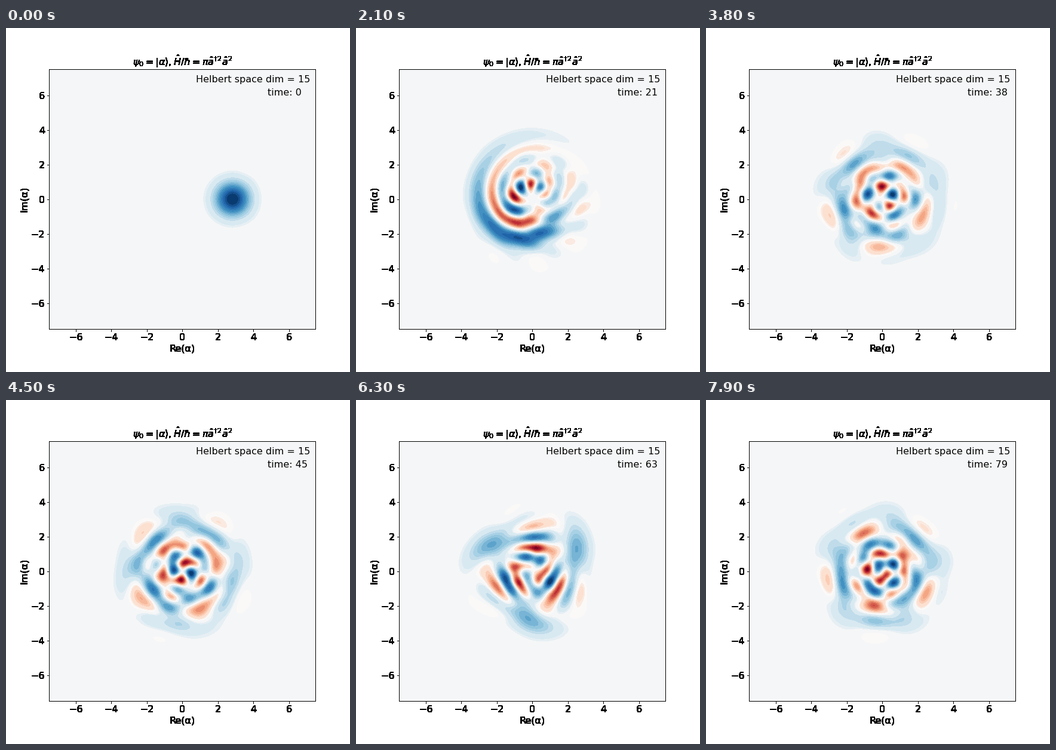
These frames come from a looping animation (576 px wide and 576 px high, 8000 ms). A matplotlib script:

```python
"""Wigner function of a coherent state evolving under a Kerr Hamiltonian."""
from math import comb, factorial, sqrt

import numpy as np
import matplotlib.pyplot as plt
from matplotlib.animation import FuncAnimation

DIM = 15          # truncated Fock space
ALPHA = 2.0
FRAMES = 80
REVIVAL = 200     # steps in one full revival
LIMIT = 7.5
BACK = "#f5f6f7"
BOX = [0.125, 0.125, 0.775, 0.755]


def coherent(dim, alpha):
    """Truncated displacement operator applied to the vacuum."""
    lower = np.diag(np.sqrt(np.arange(1, dim)), 1)
    w, v = np.linalg.eigh(1j * alpha * (lower.T - lower))
    return (v * np.exp(-1j * w)) @ v[0].conj()


def laguerre(n, k, x):
    coeffs = [(-1) ** j * comb(n + k, n - j) / factorial(j)
              for j in range(n, -1, -1)]
    return np.polyval(coeffs, x)


def wigner_basis(grid):
    """Wigner functions of |m><n| for m >= n."""
    x, y = np.meshgrid(grid, grid)
    z = sqrt(2) * (x - 1j * y)
    r2 = np.abs(z) ** 2
    pairs, parts = [], []
    for n in range(DIM):
        for m in range(n, DIM):
            k = m - n
            scale = (-1) ** n * sqrt(factorial(n) / factorial(m))
            weight = 1 if k == 0 else 2
            parts.append(weight * scale * z ** k
                         * laguerre(n, k, r2) * np.exp(-r2 / 2))
            pairs.append((m, n))
    return np.array(pairs).T, np.array(parts)


# The state never leaves the middle of the plot.
grid = np.linspace(-LIMIT, LIMIT, 200)[35:165]
(rows, cols), basis = wigner_basis(grid)
start = coherent(DIM, ALPHA)
number = np.arange(DIM)


def wigner(t):
    psi = start * np.exp(-1j * np.pi * number * (number - 1) * t)
    rho = psi[rows] * psi[cols].conj()
    w = np.tensordot(rho, basis, 1).real
    return w / np.abs(w).max()


# Colour bands, symmetric around a pale centre.
edges = np.concatenate([[0.07, 0.105], np.linspace(0.22, 0.915, 11), [1.001]])
mids = (edges[1:] + edges[:-1]) / 2
levels = np.concatenate([-edges[::-1], [-0.012], edges])
rdbu = plt.get_cmap("RdBu")
colors = (list(rdbu(0.5 - mids[::-1] / 2)) + ["#fbf9f8", BACK]
          + list(rdbu(0.5 + mids / 2)))

plt.rcParams["font.family"] = "DejaVu Sans"
plt.rcParams["font.size"] = 16
fig = plt.figure(figsize=(8, 8), dpi=72, facecolor="white")


def frame_ink(passes=60):
    """Axes, ticks and labels as if printed many times over each other."""
    ticks = range(-6, 7, 2)
    frame = fig.add_axes(BOX, xlim=(-LIMIT, LIMIT), ylim=(-LIMIT, LIMIT),
                         xticks=ticks, yticks=ticks,
                         xlabel="Re(α)", ylabel="Im(α)")
    frame.set_title(r"$\psi_0 = |\alpha\rangle, \hat{H}/\hbar = "
                    r"\pi \hat{a}^{\dagger 2} \hat{a}^2$", fontsize=16)
    fig.canvas.draw()
    light = np.array(fig.canvas.buffer_rgba())[..., 0] / 255
    frame.remove()
    ink = np.zeros(light.shape + (4,))
    ink[..., 3] = 1 - light ** passes
    return ink


fig.figimage(frame_ink(), zorder=5)

ax = fig.add_axes(BOX, facecolor=BACK, xticks=[], yticks=[])
ax.spines[:].set_visible(False)
ax.text(0.55, 0.95, f"Helbert space dim = {DIM}", transform=ax.transAxes)
clock = ax.text(0.82, 0.90, "", transform=ax.transAxes)


def update(i):
    for old in list(ax.collections):
        old.remove()
    ax.contourf(grid, grid, wigner(i / REVIVAL), levels=levels, colors=colors)
    ax.set(xlim=(-LIMIT, LIMIT), ylim=(-LIMIT, LIMIT))
    clock.set_text(f"time: {i}")


anim = FuncAnimation(fig, update, frames=FRAMES, interval=100,
                     init_func=lambda: None, repeat=True, repeat_delay=0)
plt.show()
```
